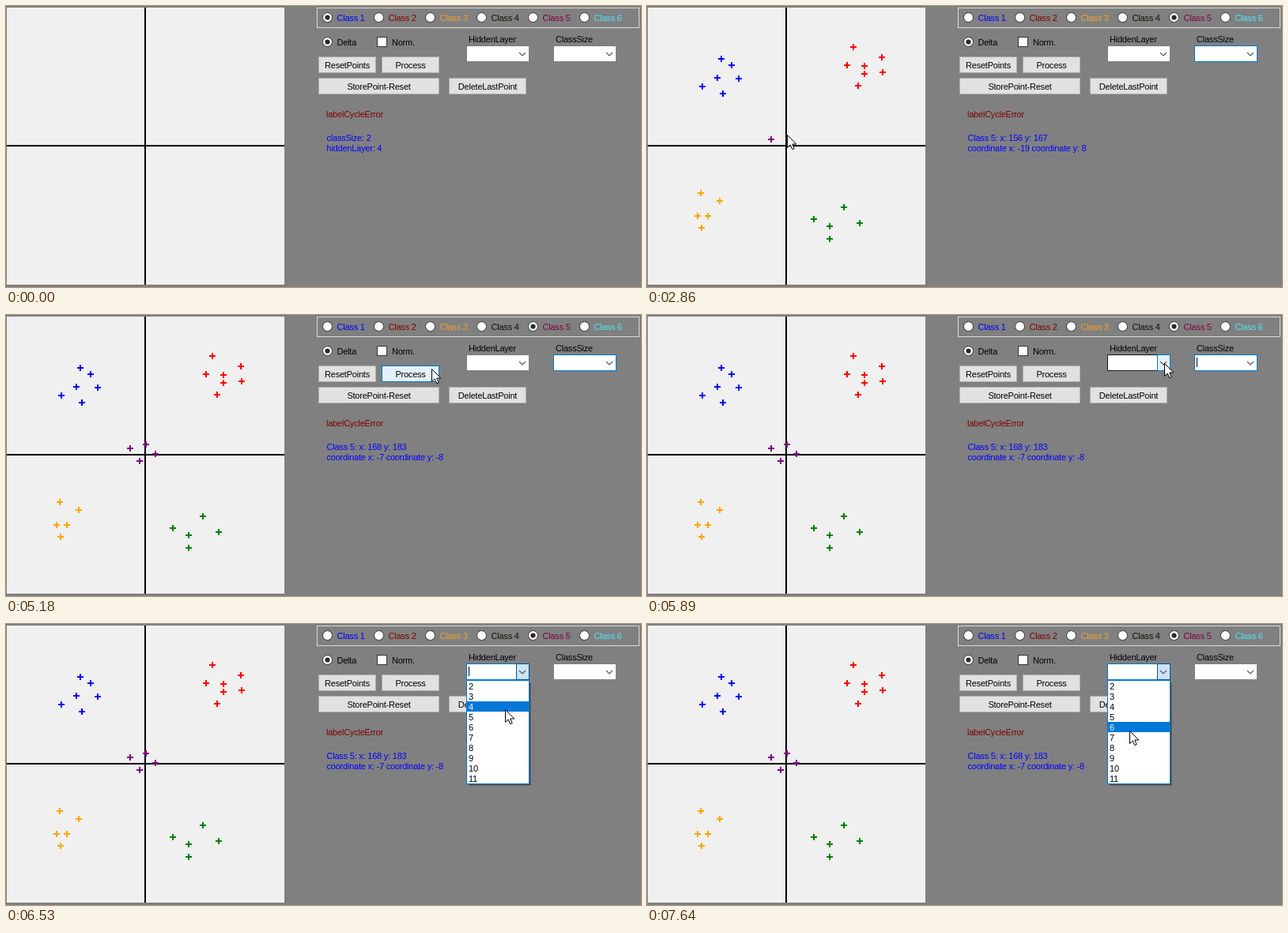
Write an HTML page that moves like this. It is 803 px wide and 356 px high and loops after 8 s.

```html
<!DOCTYPE html>
<html lang="en">
<head>
<meta charset="utf-8">
<title>Point classifier</title>
<style>
  html, body { margin: 0; width: 100%; height: 100%; overflow: hidden; background: #808080; }
  svg { display: block; }
  rect { shape-rendering: crispEdges; }
  text { font: 11px "Liberation Sans", Arial, sans-serif; letter-spacing: -.22px; white-space: pre; }
</style>
</head>
<body>
<svg id="stage" width="803" height="356" viewBox="0 0 803 356"></svg>
<script>
const LOOP = 8000, BLINK = 530;
const LOADED = 1210, FOCUSED = 2330, OPENED = 6050;
const BLUE = '#0078d7';
const ROW = 13, LIST_TOP = 72, ITEMS = 10;
const stage = document.getElementById('stage');

function add(tag, attrs, parent = stage, content = '') {
  const el = document.createElementNS('http://www.w3.org/2000/svg', tag);
  set(el, attrs);
  el.textContent = content;
  return parent.appendChild(el);
}
function set(el, attrs) {
  for (const key in attrs) el.setAttribute(key, attrs[key]);
}
const show = (el, on) => set(el, { visibility: on ? 'visible' : 'hidden' });
const group = () => add('g', {});
const rect = (x, y, width, height, fill, parent) =>
  add('rect', { x, y, width, height, fill }, parent);
// One pixel outline lying inside the given box.
const box = (x, y, w, h, fill, stroke, parent) =>
  set2(rect(x + .5, y + .5, w - 1, h - 1, fill, parent), { stroke });
function set2(el, attrs) { set(el, attrs); return el; }
const label = (x, y, content, fill = '#000', parent, anchor = 'start') =>
  add('text', { x, y, fill, 'text-anchor': anchor }, parent, content);

function radio(x, y, content, color) {
  add('circle', { cx: x, cy: y, r: 6, fill: '#fff', stroke: '#333' });
  label(x + 12, y + 4.5, content, color);
  return add('circle', { cx: x, cy: y, r: 3.1, fill: '#2a2a2a' });
}
function button(x, y, w, content) {
  const face = box(x, y, w, 21, '#e1e1e1', '#adadad');
  label(x + w / 2, y + 14.5, content, '#000', stage, 'middle');
  return { x, y, w, h: 21, face };
}
function combo(x, title) {
  label(x + 2, 46, title);
  rect(x, 51, 78, 19, '#fff');
  const frame = box(x - 1, 50, 80, 21, '#fff', BLUE);
  const drop = box(x + 62, 50, 17, 21, '#e5f1fb', BLUE);
  add('path', { d: `M${x + 66} 59l4 4 4-4`, fill: 'none', stroke: '#555', 'stroke-width': 1.1 });
  const caret = rect(x + 2, 54, 1, 12, '#000');
  return { x, y: 50, w: 79, h: 21, frame, drop, caret };
}
function plus(x, y, color, parent) {
  return add('path', {
    d: `M${x - 4} ${y}h8M${x} ${y - 4}v8`, stroke: color, 'stroke-width': 2,
    'shape-rendering': 'crispEdges'
  }, parent);
}

// Plot area
rect(1, 2, 351, 351, '#f0f0f0');
rect(175, 2, 2, 351, '#000');
rect(1, 176, 351, 2, '#000');

const samples = group();
const clusters = {
  blue: [[94, 67], [107, 75], [89, 91], [116, 92], [70, 102], [96, 111]],
  red: [[261, 52], [297, 65], [253, 75], [275, 76], [275, 86], [298, 84], [267, 101]],
  orange: [[68, 237], [92, 247], [64, 266], [77, 266], [69, 281]],
  green: [[249, 255], [211, 270], [269, 275], [231, 279], [231, 295]]
};
for (const color in clusters)
  for (const [x, y] of clusters[color]) plus(x, y, color, samples);

const clicks = [
  { at: LOADED, cls: 4, x: 268, y: 273 },
  { at: FOCUSED, cls: 5, x: 156, y: 167 },
  { at: 3170, cls: 5, x: 176, y: 162 },
  { at: 3810, cls: 5, x: 188, y: 174 },
  { at: 4580, cls: 5, x: 168, y: 183 }
];
for (const click of clicks)
  click.mark = plus(click.x + 1, click.y + 2, click.cls === 4 ? 'green' : 'purple');

// Controls
box(393, 2, 408, 26, 'none', '#dcdcdc');
const classDots = ['#0000ff', '#800000', '#f0a030', '#101008', '#800040', '#48e8f8']
  .map((color, i) => radio(406.5 + 65 * i, 14.5, `Class ${i + 1}`, color));
radio(406.5, 45.5, 'Delta');
box(469, 39, 13, 13, '#fff', '#333');
label(488, 50, 'Norm.');
const buttons = [
  button(395, 64, 73, 'ResetPoints'),
  button(475, 64, 73, 'Process'),
  button(395, 91, 153, 'StorePoint-Reset'),
  button(560, 91, 98, 'DeleteLastPoint')
];
const hiddenLayer = combo(583, 'HiddenLayer');
const classSize = combo(693, 'ClassSize');
label(405, 141, 'labelCycleError', '#800000');
const info = [label(405.5, 171, '', '#00f'), label(405.5, 184, '', '#00f')];

// Drop-down list
const list = group();
rect(586, 75, 78, 130, 'rgba(0,0,0,.2)', list);
rect(585, 74, 78, 130, 'rgba(0,0,0,.3)', list);
box(582, 71, 80, 132, '#fff', BLUE, list);
const highlight = rect(583, 0, 78, ROW, BLUE, list);
const items = Array.from({ length: ITEMS }, (_, i) =>
  label(585, LIST_TOP + ROW * i + 11, i + 2, '#000', list));

const cursor = add('path', {
  d: 'M.5 .5V16.5L4.2 13L6.8 18.7L9.2 17.6L6.7 12H11.8Z',
  fill: '#fff', stroke: '#000', 'stroke-width': 1
});

// Cursor stops: time, x, y
const path = [
  [1410, 676, 338], [1540, 247, 168],
  [1750, 247, 168], [2050, 157, 168],
  [2540, 157, 168], [2860, 177, 163],
  [3310, 177, 163], [3450, 189, 175],
  [3940, 189, 175], [4220, 169, 185],
  [4750, 169, 185], [4960, 535, 68],
  [5170, 535, 68], [5890, 654, 61],
  [6250, 654, 61], [6530, 631, 108], [6720, 617, 156],
  [6960, 617, 156], [7410, 610, 135]
];
function cursorAt(t) {
  const next = path.findIndex(stop => stop[0] > t);
  if (next === 0) return null;
  if (next < 0) return path[path.length - 1].slice(1);
  const [t0, x0, y0] = path[next - 1], [t1, x1, y1] = path[next];
  const u = (t - t0) / (t1 - t0);
  const k = u * (1.4 - .4 * u);
  return [Math.round(x0 + (x1 - x0) * k), Math.round(y0 + (y1 - y0) * k)];
}

const inside = (pos, b) => !!pos &&
  pos[0] >= b.x && pos[0] < b.x + b.w && pos[1] >= b.y && pos[1] < b.y + b.h;
const blink = (t, start) => Math.floor((t - start) / BLINK) % 2 === 0;

function drawCombo(c, { focused, hover, open, caret }) {
  show(c.frame, focused || hover);
  set(c.frame, { stroke: focused ? BLUE : '#171717' });
  show(c.drop, hover || open);
  set(c.drop, { fill: open ? '#cce4f7' : '#e5f1fb', stroke: open ? '#005499' : BLUE });
  show(c.caret, caret);
}

function draw(t) {
  const pos = cursorAt(t), loaded = t >= LOADED, open = t >= OPENED;

  show(samples, loaded);
  clicks.forEach(c => show(c.mark, t >= c.at));
  classDots.forEach((dot, i) => show(dot, i === (loaded ? 4 : 0)));

  const last = clicks.filter(c => t >= c.at).pop();
  info[0].textContent = last ? `Class ${last.cls}: x: ${last.x} y: ${last.y}` : 'classSize: 2';
  info[1].textContent = last
    ? `coordinate x: ${last.x - 175} coordinate y: ${175 - last.y}` : 'hiddenLayer: 4';

  for (const b of buttons) {
    const hover = !open && inside(pos, b);
    set(b.face, { fill: hover ? '#e5f1fb' : '#e1e1e1', stroke: hover ? BLUE : '#adadad' });
  }

  const sizeFocused = t >= FOCUSED && !open;
  drawCombo(classSize, {
    focused: sizeFocused, hover: false, open: false,
    caret: sizeFocused && blink(t, FOCUSED - 40)
  });
  drawCombo(hiddenLayer, {
    focused: open, hover: inside(pos, hiddenLayer), open,
    caret: open && blink(t, OPENED)
  });

  show(list, open);
  const row = open ? Math.floor((pos[1] - LIST_TOP) / ROW) : -1;
  show(highlight, row >= 0);
  set(highlight, { y: LIST_TOP + ROW * row });
  items.forEach((item, i) => set(item, { fill: i === row ? '#fff' : '#000' }));

  show(cursor, pos);
  if (pos) set(cursor, { transform: `translate(${pos})` });
}

const start = performance.now();
function tick() {
  draw((performance.now() - start) % LOOP);
  requestAnimationFrame(tick);
}
tick();
</script>
</body>
</html>
```
